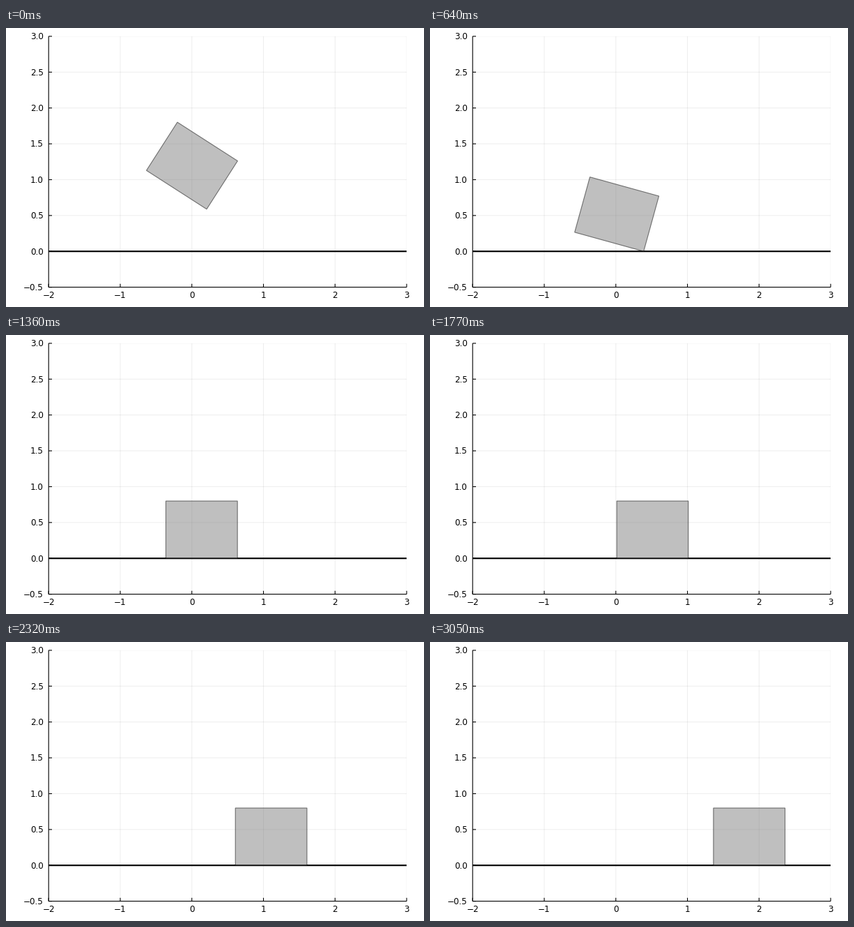
Write a matplotlib script that moves like this. It is 600 px wide and 400 px high and loops after 3.1 s.

```python
import numpy as np
import matplotlib.pyplot as plt
from matplotlib.animation import FuncAnimation
from matplotlib.patches import Polygon
from matplotlib.transforms import Affine2D

plt.rcParams["font.family"] = "DejaVu Sans"

W, H, DPI = 600, 400, 100
LEFT, RIGHT, TOP, BOTTOM = 61.2, 575.1, 11.9, 371.6
UNIT = (RIGHT - LEFT) / 5
LOOP_MS, TICK_MS = 3100, 20
PX = 72 / DPI

# The simulation is sampled at 22 poses per second.
STARTS = 10 * np.floor(np.arange(68) * 100 / 22 + 0.5)

# Each contact event repeats the pose before it.
IMPACT, REVERSAL, LANDING, SETTLE = 8, 17, 24, 27
STICK = 36


def to_x(px):
    return (px - LEFT) / UNIT - 2


def pose(k):
    """Centre x, centre y and clockwise tilt in degrees at sample k."""
    if k <= IMPACT:
        # free fall with constant drift and spin
        m = min(k, IMPACT - 1)
        x = 267 + 13.5 * m / 7
        tilt = 32.7 - 7.6 * m / 7
        return to_x(x), 1.195 - 0.0126 * m * m, tilt

    tilt = 0
    if k < LANDING - 1:
        # one corner slides while the box tips flat
        m = k - 9 - (k >= REVERSAL)
        x = 277.75 - 2.95 * m + 0.204 * m * m
        tilt = 23.57 - 1.56 * m - 0.0138 * m * m
    elif k <= STICK:
        # friction speeds the flat box up
        m = max(k - LANDING, 0) - (k >= SETTLE)
        x = 272.2 + 0.694 * m + 0.207 * m * m
    else:
        # carried along at a slowly varying speed
        w, mid = 0.035, 49.5
        x = 305.2 + 5.2 / w * (np.sin(w * (k - mid)) - np.sin(w * (STICK - mid)))
    a = np.radians(tilt)
    return to_x(x), 0.5 * np.sin(a) + 0.4 * np.cos(a), tilt


def corners(k):
    x, y, tilt = pose(k)
    a = -np.radians(tilt)
    rot = np.array([[np.cos(a), -np.sin(a)], [np.sin(a), np.cos(a)]])
    box = np.array([[-0.5, -0.4], [0.5, -0.4], [0.5, 0.4], [-0.5, 0.4]])
    return box @ rot.T + (x, y)


def label(v, digits):
    return f"{v:.{digits}f}".replace("-", "\u2212")


fig = plt.figure(figsize=(W / DPI, H / DPI), dpi=DPI, facecolor="white")
ax = fig.add_axes([LEFT / W, 1 - BOTTOM / H, (RIGHT - LEFT) / W, (BOTTOM - TOP) / H])
ax.set(xlim=(-2, 3), ylim=(-0.5, 3))
ax.spines[:].set_visible(False)

xt, yt = np.arange(-2, 4), np.arange(-0.5, 3.1, 0.5)
ax.set_xticks(xt, [label(v, 0) for v in xt])
ax.set_yticks(yt, [label(v, 1) for v in yt])
ax.tick_params(length=0, labelsize=12 * PX)
ax.tick_params(axis="x", pad=5.8 * PX)
ax.tick_params(axis="y", pad=7.4 * PX)
for text in ax.get_yticklabels():
    text.set_transform(text.get_transform() + Affine2D().translate(0, 0.7))

# Rules are drawn unsnapped so they keep their fractional positions.
grid = dict(color="black", alpha=0.07, linewidth=PX, zorder=0, snap=False)
ax.vlines(xt, -0.5, 3, **grid)
ax.hlines(yt, -2, 3, **grid)

axis = dict(color="black", linewidth=1.1 * PX, zorder=1, snap=False, clip_on=False)
tick = 4.8 / UNIT
ax.vlines(-2, -0.5, 3, **axis)
ax.hlines(-0.5, -2, 3, **axis)
ax.vlines(xt, -0.5, -0.5 + tick, **axis)
ax.hlines(yt, -2, -2 + tick, **axis)

ax.hlines(0, -2, 3, color="black", linewidth=2.1 * PX, zorder=2, snap=False)
block = Polygon(corners(0), closed=True, facecolor=(0.5, 0.5, 0.5, 0.5),
                edgecolor=(0, 0, 0, 0.5), linewidth=1.1 * PX,
                joinstyle="miter", zorder=3, snap=False)
ax.add_patch(block)


def update(n):
    t = (n + 0.5) * TICK_MS
    block.set_xy(corners(np.searchsorted(STARTS, t, side="right") - 1))
    return (block,)


anim = FuncAnimation(fig, update, frames=LOOP_MS // TICK_MS, interval=TICK_MS,
                     init_func=lambda: update(0), repeat=True, repeat_delay=0)
plt.show()
```
